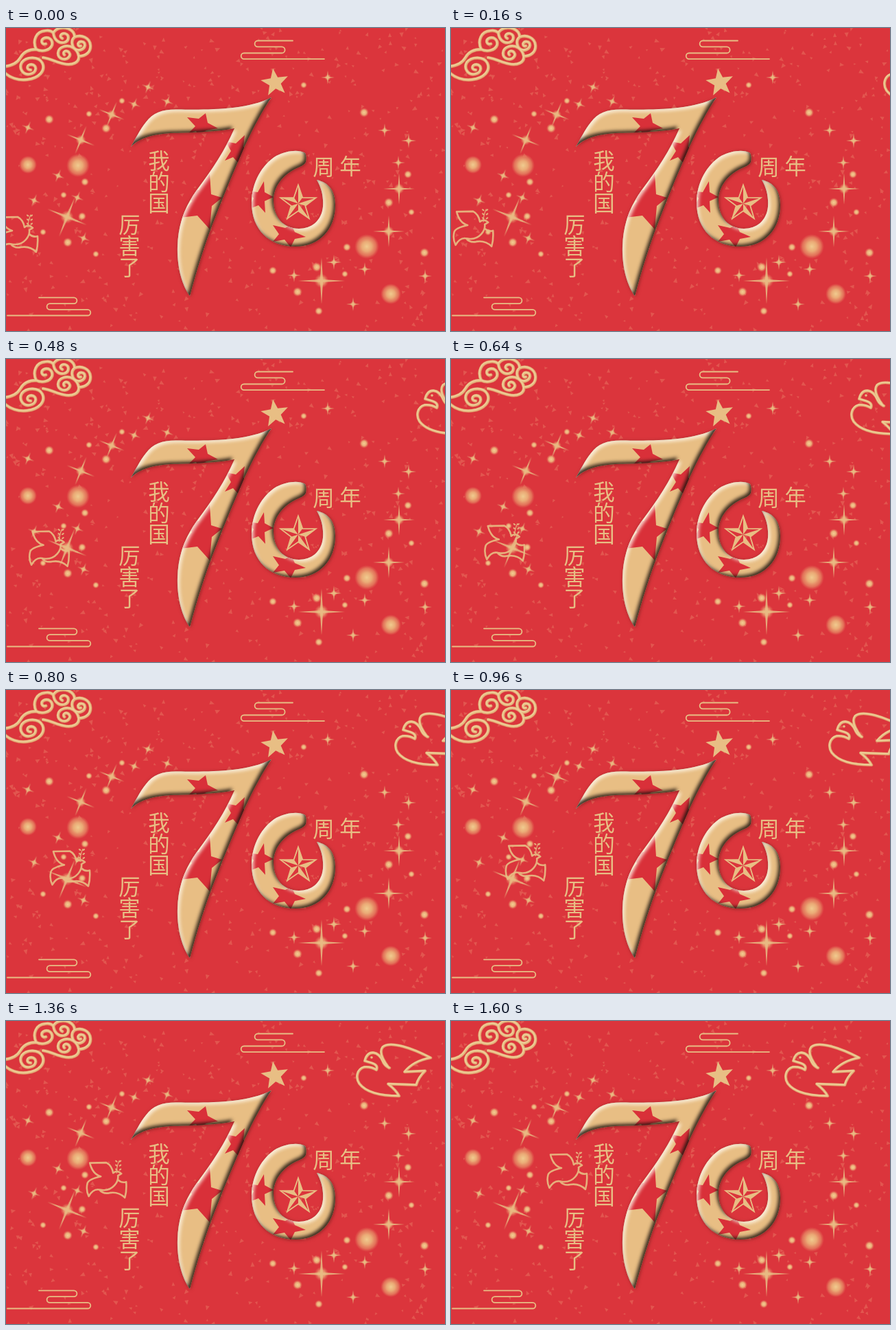
An HTML page that plays this animation: 640x441 px, repeating every 1.92 s.

```html
<!DOCTYPE html>
<html lang="zh">
<head>
<meta charset="utf-8">
<title>70</title>
<style>
  html, body { margin: 0; width: 100%; height: 100%; overflow: hidden; background: #db353c; }
  svg { display: block; width: 100vw; height: 100vh; }
  text { font: 300 31.5px "Noto Sans CJK SC", "Noto Sans CJK", sans-serif; text-anchor: middle; fill: #e8be84; }
  .line { fill: none; stroke: #e8be84; stroke-linecap: round; stroke-linejoin: round; }
  .gold { fill: #e8be84; }
  .red { fill: #d93039; }
</style>
</head>
<body>
<svg viewBox="0 0 640 441" preserveAspectRatio="none">
  <defs>
    <filter id="bevel" x="-10%" y="-10%" width="120%" height="120%" color-interpolation-filters="sRGB">
      <feGaussianBlur in="SourceAlpha" stdDeviation="2.8" result="blur"/>
      <feOffset in="blur" dx="-3.2" dy="-3.2" result="up"/>
      <feFlood flood-color="#1c120c" flood-opacity=".85"/>
      <feComposite operator="out" in2="up"/>
      <feComposite operator="in" in2="SourceAlpha" result="dark"/>
      <feOffset in="blur" dx="3" dy="3" result="down"/>
      <feFlood flood-color="#fff8ea" flood-opacity=".85"/>
      <feComposite operator="out" in2="down"/>
      <feComposite operator="in" in2="SourceAlpha" result="light"/>
      <feOffset in="blur" dx="1" dy="1" result="cast"/>
      <feFlood flood-color="#5c1712" flood-opacity=".6"/>
      <feComposite operator="in" in2="cast" result="shade"/>
      <feMerge>
        <feMergeNode in="shade"/><feMergeNode in="SourceGraphic"/>
        <feMergeNode in="light"/><feMergeNode in="dark"/>
      </feMerge>
    </filter>
    <filter id="soft" x="-20%" y="-20%" width="140%" height="140%"><feGaussianBlur stdDeviation=".5"/></filter>
    <radialGradient id="glow">
      <stop offset="0" stop-color="#f3cf94"/>
      <stop offset=".5" stop-color="#ecb97e" stop-opacity=".9"/>
      <stop offset="1" stop-color="#e67f60" stop-opacity="0"/>
    </radialGradient>
    <radialGradient id="disc">
      <stop offset="0" stop-color="#f0cb8f"/>
      <stop offset=".4" stop-color="#ecb77c" stop-opacity=".9"/>
      <stop offset=".75" stop-color="#e89a6c" stop-opacity=".6"/>
      <stop offset="1" stop-color="#e67f60" stop-opacity="0"/>
    </radialGradient>
    <path id="seven" d="M182 173C188 163 195 148 204 137C214 123 229 118 250 118.500C290 119 350 120 387 101
      C375 118 360 146 348 172C333 206 318 242 304 278C290 314 278 352 268 390
      C256 374 249 346 250 318C251 284 261 260 278 236C300 207 320 177 333 146
      C312 150 284 152 256 152.500C226 153 198 156 182 173Z"/>
    <path id="zero" d="M436 182C426 176 408 179 394 186C373 199 358 225 358 254C358 294 384 318 422 318
      C458 318 480 292 480 258C480 237 471 225 453 221C460 233 463 246 462 260C460 281 445 292 427 292
      C405 292 390 276 390 251C390 231 403 215 420 206C428 202 435 200 437 195C438 190 438 186 436 182Z"/>
    <clipPath id="inSeven"><use href="#seven"/></clipPath>
    <clipPath id="inZero"><use href="#zero"/></clipPath>
  </defs>

  <rect width="640" height="441" fill="#db353c"/>
  <path id="flecks" fill="#e2564f"/>
  <g id="sparks"></g>

  <g class="line" stroke-width="1.8">
    <path d="M418 18.500H367a4.400 4.400 0 0 0 0 8.800H402a4.600 4.600 0 0 1 0 9.200H347a4.300 4.300 0 0 0 0 8.600H464"/>
    <path d="M48 392.300H99a4.400 4.400 0 0 1 0 8.800H64a4.400 4.400 0 0 0 0 8.800H119a4.300 4.300 0 0 1 0 8.600H2"/>
  </g>

  <g filter="url(#soft)">
    <path id="swirls" d="M-3 56C8 55 17 50 21 43C26 34 35 31 44 31C38 18 44 5 57 4C62 3 66 4 69 7
      C73 0 82-2 91 1C98 4 100 8 100 13C110 9 122 14 123 25C124 35 116 41 106 41C107 50 97 55 84 52
      C74 50 66 45 54 43M44 31C52 35 64 33 67 25C69 17 62 12 55 15C50 18 52 25 58 23
      M69 7C70 17 77 23 85 21C92 19 93 10 86 8C80 7 77 13 82 15
      M100 13C94 18 96 26 100 30C105 34 114 32 115 25C115 19 107 18 105 23C105 26 107 27 109 26
      M106 41C104 30 94 24 84 27C74 30 73 42 82 45C91 47 97 38 90 34C86 32 82 36 85 39
      M-3 64C5 72 18 77 31 75C48 73 58 62 53 51C48 41 30 41 23 50C18 59 25 69 35 67C45 65 46 54 37 53C30 53 29 61 36 61"/>
  </g>

  <g filter="url(#bevel)">
    <use href="#seven" class="gold"/>
    <g clip-path="url(#inSeven)" class="red">
      <path d="M264 130L281 132L291 124L294 138L309 146L292 149L280 156L277 150L266 153L276 143Z"/>
      <path d="M320 165L335 168L348 156L346 173L359 181L344 184L340 198L331 188L319 193L328 179Z"/>
      <path d="M297 212L299 242L315 247L300 259L297 293L279 273L254 276L271 252L260 232L281 236Z"/>
    </g>
  </g>
  <g filter="url(#bevel)">
    <use href="#zero" class="gold"/>
    <g clip-path="url(#inZero)" class="red">
      <path d="M376 223L377 239L390 246L377 252L378 269L368 258L353 264L361 248L353 237L367 239Z"/>
      <path d="M389 287L407 291L416 286L421 297L437 304L421 307L415 319L406 308L389 311L398 300Z"/>
    </g>
  </g>
  <path id="topStar" class="gold"/>
  <g id="badge"></g>

  <g id="words"></g>

  <g id="small" opacity=".9">
    <g class="line" stroke-width="2.6">
      <path d="M145 194.500L169 194Q177 198 179 209M145 194.500Q149 211 161 214Q143 218 141.500 224Q139 234 143.500 243
        Q150 231 160 233.500Q173 236 181 227Q187 220 186 213M179 209Q185 204 191 210L186 213
        M186 219Q191 224 198 222Q199 235 196 245Q187 236 174 238Q164 240 159 233.500"/>
      <path stroke-width="1.2" d="M184 209Q184 199 188 191"/>
    </g>
    <g id="leaves" class="gold"></g>
  </g>

  <g id="large">
    <path id="bird" d="M534 68Q518 47 525 38C536 28 569 40 595 53.500Q570 58 557 74L587 72.500Q577 82 574 93L533 91.500
      Q545 101 549 109C523 109 501 104 491 91C485 82 488 70 498 67Q508 66 516 71Q519 64 509 61L499 58
      Q502 46 511 46Q521 47 526 60Q529 66 535 68"/>
    <circle cx="509" cy="53" r="1.8" class="gold"/>
  </g>
</svg>
<script>
const $ = id => document.getElementById(id);
const LOOP = 1920, STEP = 40, LAST = 40;

// Repeatable random numbers
let seed = 70;
const rnd = () => (seed = seed * 16807 % 2147483647) / 2147483647;

function scatter() {
  let d = '';
  for (let i = 0; i < 520; i++) {
    const x = rnd() * 640, y = rnd() * 441, r = 1.8 + rnd() * 2.6, a = rnd() * 6.28;
    const at = (turn, k) => (x + Math.cos(a + turn) * r * k).toFixed(1) + ' ' + (y + Math.sin(a + turn) * r * k).toFixed(1);
    d += `M${at(0, 1.2)}L${at(2, .9)}L${at(4, .8)}Z`;
  }
  $('flecks').setAttribute('d', d);
}

// Corners of a five-pointed star, outer and inner in turn
function corners(x, y, r, inner, turn) {
  return Array.from({ length: 10 }, (_, i) => {
    const a = (turn - 90 + i * 36) * Math.PI / 180, k = i % 2 ? r * inner : r;
    return (x + k * Math.cos(a)).toFixed(1) + ' ' + (y + k * Math.sin(a)).toFixed(1);
  });
}

function triples(list, draw) {
  let out = '';
  for (let i = 0; i < list.length; i += 3) out += draw(list[i], list[i + 1], list[i + 2]);
  return out;
}

const rays = [
  154,126,20, 109,163,22, 89,275,31, 187,111,10, 207,86,10, 235,107,10, 32,145,10, 76,215,10,
  41,251,10, 113,306,10, 104,247,10, 573,234,23, 558,296,23, 460,368,34, 469,72,10, 552,149,10,
  587,164,11, 572,196,10, 478,341,11, 420,360,10, 523,351,10, 506,402,10, 611,361,10
];
const dots = [
  169,106,5, 63,133,7, 121,125,5, 146,146,7, 115,224,6, 84,243,5, 111,274,6, 54,297,5, 90,312,7,
  131,329,5, 434,83,5, 522,123,7, 586,213,6, 558,254,7, 591,268,5, 497,319,6, 389,353,6,
  494,358,5, 425,384,7, 456,412,6, 610,327,7, 453,348,7
];
const discs = [32,199,13, 105,200,17, 526,318,18, 561,387,15];

function ray(x, y, r) {
  const w = .7 + r * .04, tilt = x < 300 ? 22 : 0;
  return `<g transform="translate(${x} ${y}) rotate(${tilt})">
    <circle r="${2 + r * .25}" fill="url(#glow)" opacity=".8"/>
    <path class="gold" opacity=".85" filter="url(#soft)"
      d="M0 ${-r}L${w} ${-w}L${r} 0L${w} ${w}L0 ${r}L${-w} ${w}L${-r} 0L${-w} ${-w}Z"/></g>`;
}
const ball = fill => (x, y, r) => `<circle cx="${x}" cy="${y}" r="${r}" fill="url(#${fill})"/>`;

// Three strokes give a thin line a raised look
function raise(id, width) {
  const path = $(id), box = path.parentNode;
  const layers = [['#d9795a', width + 1, .2], ['#e6b97e', width, 0], ['#efcf9c', width * .35, -.4]];
  for (const [color, w, shift] of layers) {
    const copy = path.cloneNode();
    copy.removeAttribute('id');
    copy.setAttribute('class', 'line');
    copy.style.stroke = color;
    copy.setAttribute('stroke-width', w);
    copy.setAttribute('transform', `translate(${shift} ${shift})`);
    box.insertBefore(copy, path);
  }
  path.remove();
}

function build() {
  scatter();
  $('sparks').innerHTML = triples(discs, ball('disc')) + triples(dots, ball('glow')) + triples(rays, ray);
  $('topStar').setAttribute('d', 'M' + corners(392, 79.5, 21, .42, -8).join('L') + 'Z');

  const p = corners(426, 255.5, 27, .4, 0);
  let facets = `<path class="line" stroke-width="1.8" style="stroke-linejoin:miter" d="M${p.join('L')}Z"/>`;
  for (let i = 0; i < 10; i += 2) facets += `<path class="gold" d="M426 255.5L${p[i]}L${p[i + 1]}Z"/>`;
  $('badge').innerHTML = facets;

  const words = [['我', 223, 205], ['的', 223, 236], ['国', 223, 267], ['厉', 180, 298],
    ['害', 180, 329], ['了', 180, 360], ['周', 463, 213.5], ['年', 502, 212.5]];
  $('words').innerHTML = words.map(([c, x, y]) =>
    `<text x="${x}" y="${y}"${x === 180 ? ' style="font-weight:400"' : ''}>${c}</text>`).join('');

  let leaves = '';
  for (let i = 0; i < 6; i++) {
    const side = i % 2 ? 1 : -1, x = 186.5 + side * 2.8, y = 192 + (i >> 1) * 6;
    leaves += `<ellipse cx="${x}" cy="${y}" rx="2.1" ry="1.1" transform="rotate(${-side * 35} ${x} ${y})"/>`;
  }
  $('leaves').innerHTML = leaves;
  raise('swirls', 3.8);
  raise('bird', 3.3);
}

function draw(now) {
  const left = 1 - Math.min(LAST, Math.floor(now % LOOP / STEP)) / LAST;
  $('small').setAttribute('transform', `translate(${-152 * left} ${81 * left})`);
  $('large').setAttribute('transform', `translate(${160 * left} 0)`);
}

build();
const start = performance.now();
function tick() {
  draw(performance.now() - start);
  requestAnimationFrame(tick);
}
tick();
</script>
</body>
</html>
```
